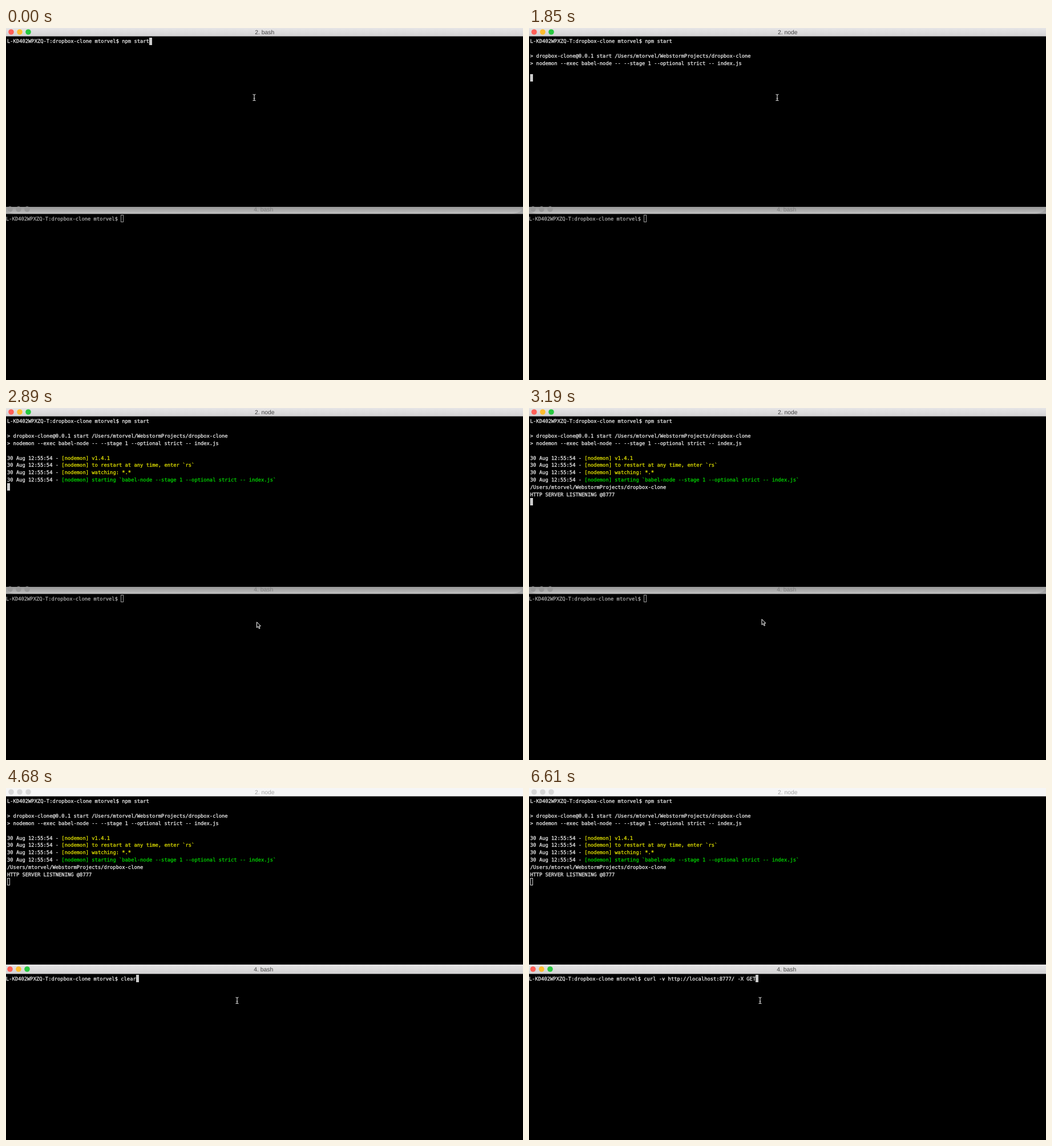
An HTML page that plays this animation: 906x618 px, repeating every 8 s.

```html
<!DOCTYPE html>
<html lang="en">
<head>
<meta charset="utf-8">
<title>Two terminals</title>
<style>
  html, body { margin: 0; width: 100%; height: 100%; overflow: hidden; background: #000; }
  svg { display: block; width: 906px; height: 618px; }
  text { white-space: pre; text-rendering: geometricPrecision; }
  .mono { font: 8.8px "DejaVu Sans Mono", "Liberation Mono", monospace; fill: #f2f2f2; stroke: #f2f2f2; stroke-width: .25px; }
  .mono.dim { fill: #b0b0b0; stroke: #b0b0b0; }
  .yellow { fill: #e8e800; stroke: #e8e800; }
  .green { fill: #00dc00; stroke: #00dc00; }
  .title { font: 10.4px "Liberation Sans", Arial, sans-serif; text-anchor: middle; }
</style>
</head>
<body>
<svg id="stage" viewBox="0 0 906 618">
  <defs>
    <linearGradient id="active" x2="0" y2="1">
      <stop offset="0" stop-color="#e6e5e6"/><stop offset="1" stop-color="#d2d1d2"/>
    </linearGradient>
    <linearGradient id="shade" x2="0" y2="1">
      <stop offset="0" stop-color="#979797"/><stop offset="1" stop-color="#c2c2c2"/>
    </linearGradient>
  </defs>
</svg>
<script>
const LOOP = 8000, CELL = 5.298, ROW = 12.84;
const HOST = 'L-KD402WPXZQ-T', USER = 'mtorvel', DIR = 'dropbox-clone';
const PROMPT = `${HOST}:${DIR} ${USER}$ `;
const PATH = `/Users/${USER}/WebstormProjects/${DIR}`;
const STAMP = '30 Aug 12:55:54 - ';
const FOCUS = 3490;

const stage = document.getElementById('stage');

function add(parent, tag, attrs = {}, text = '') {
  const el = document.createElementNS('http://www.w3.org/2000/svg', tag);
  set(el, attrs);
  el.textContent = text;
  parent.append(el);
  return el;
}
function set(el, attrs) { for (const k in attrs) el.setAttribute(k, attrs[k]); }
const show = (el, on) => { el.style.display = on ? '' : 'none'; };
// Last row of a table whose first column is not after t
const at = (table, t) => table.findLast(row => row[0] <= t);

// Output rows: [time, row, plain text, coloured text, colour]
const OUTPUT = [
  [0, 0, PROMPT + 'npm start'],
  [1850, 2, `> ${DIR}@0.0.1 start ${PATH}`],
  [1850, 3, '> nodemon --exec babel-node -- --stage 1 --optional strict -- index.js'],
  [2150, 5, STAMP, '[nodemon] v1.4.1', 'yellow'],
  [2150, 6, STAMP, '[nodemon] to restart at any time, enter `rs`', 'yellow'],
  [2150, 7, STAMP, '[nodemon] watching: *.*', 'yellow'],
  [2150, 8, STAMP, '[nodemon] starting `babel-node --stage 1 --optional strict -- index.js`', 'green'],
  [3040, 9, PATH],
  [3040, 10, 'HTTP SERVER LISTNENING @8777'],
];
// Upper caret: [time, column, row]
const CARET = [[0, 47, 0], [1500, 0, 1], [1850, 0, 5], [2150, 0, 9], [3040, 0, 11]];
// Lower command line: [time, text]
const TYPED = [
  [0, ''],
  [4680, 'clear'],
  [4970, 'curl -v http://localhost:8777/test.txt -X GET'],
  [6010, 'clear'],
  [6610, 'curl -v http://localhost:8777/ -X GET'],
];
// Mouse: [time, shape, x, y]
const MOUSE = [
  [0, 'beam', 435, 122], [2750, 'beam', 428, 147], [2890, 'arrow', 439, 375],
  [3040, 'arrow', 415, 371], [3190, 'arrow', 407.5, 370],
  [3490, 'beam', 408, 374], [3780, 'beam', 405, 373],
];

function makeBar(x, mid) {
  const bg = add(stage, 'rect', { x: 0, width: 906 });
  const lights = [0, 15, 30].map(dx => add(stage, 'circle', { cx: x + dx, cy: mid, r: 4.8 }));
  const title = add(stage, 'text', { class: 'title', x: x + 444.3, y: mid + 3.8 });
  return { bg, lights, title };
}
function paintBar(bar, y, bottom, fill, lights, ink, name) {
  set(bar.bg, { y, height: bottom - y, fill });
  bar.lights.forEach((c, i) => set(c, { fill: lights[i % lights.length] }));
  bar.title.setAttribute('fill', ink);
  bar.title.textContent = name;
}
// A filled block when solid, else a one pixel outline of the same size
function paintCaret(el, x, y, solid, ink) {
  const inset = solid ? 0 : .5;
  set(el, {
    x: Math.round(x) + inset, y: Math.round(y) + inset,
    width: 5 - 2 * inset, height: 13 - 2 * inset,
    fill: solid ? ink : 'none', stroke: solid ? 'none' : ink,
  });
}

const COLOURS = ['#ff5f57', '#ffbd2e', '#28c840'];

const rows = OUTPUT.map(([time, row, plain, tinted, colour]) => {
  const el = add(stage, 'text', { class: 'mono', x: 2, y: 26.3 + row * ROW }, plain);
  if (tinted) add(el, 'tspan', { class: colour }, tinted);
  return { time, el };
});
const topCaret = add(stage, 'rect');
const topBar = makeBar(9, 7);
const lowBar = makeBar(7, 318);
const corners = add(stage, 'path', {
  d: 'M0 316Q2 325 14 326H0ZM906 316Q902 325 886 326H906Z', fill: '#888', opacity: .4,
});
const lowLine = add(stage, 'text', { x: 0, y: 337.9 });
const lowCaret = add(stage, 'rect');

const shapes = {
  beam: add(stage, 'path', {
    d: 'M-2.5 -5.5Q-.5 -5.5 0 -4.3Q.5 -5.5 2.5 -5.5M0 -4.3V4.3M-2.5 5.5Q-.5 5.5 0 4.3Q.5 5.5 2.5 5.5M-1.3 1.5H1.3',
    fill: 'none', stroke: '#e4e4e4', 'stroke-width': 1.1,
  }),
  arrow: add(stage, 'path', {
    d: 'M.5 .8V10.6L2.8 8.5L4.5 12.4L6 11.7L4.4 7.9H7.4Z',
    fill: '#000', stroke: '#fff', 'stroke-width': 1,
  }),
};

function render(t) {
  const low = t >= FOCUS;
  rows.forEach(r => show(r.el, t >= r.time));

  const [, col, row] = at(CARET, t);
  paintCaret(topCaret, 2 + col * CELL, 16.5 + row * ROW, !low, '#cbcbcb');

  const job = t < 1700 ? '2. bash' : '2. node';
  if (low) {
    paintBar(topBar, 0, 14.6, '#f6f6f6', ['#d8d8d8'], '#a4a4a4', job);
    paintBar(lowBar, 310, 326.4, 'url(#active)', COLOURS, '#444', '4. bash');
  } else {
    paintBar(topBar, 0, 14.6, 'url(#active)', COLOURS, '#444', job);
    paintBar(lowBar, 314, 326.4, 'url(#shade)', ['#989898'], '#7c7c7c', '4. bash');
  }
  show(corners, !low);

  const typed = at(TYPED, t)[1];
  lowLine.setAttribute('class', low ? 'mono' : 'mono dim');
  lowLine.textContent = PROMPT + typed;
  paintCaret(lowCaret, (PROMPT + typed).length * CELL, 328, t >= 3640, low ? '#cbcbcb' : '#a0a0a0');

  const [, shape, x, y] = at(MOUSE, t);
  for (const k in shapes) show(shapes[k], k === shape);
  shapes[shape].setAttribute('transform', `translate(${x} ${y})`);
}

const start = performance.now();
function tick() {
  render((performance.now() - start) % LOOP);
  requestAnimationFrame(tick);
}
tick();
</script>
</body>
</html>
```
